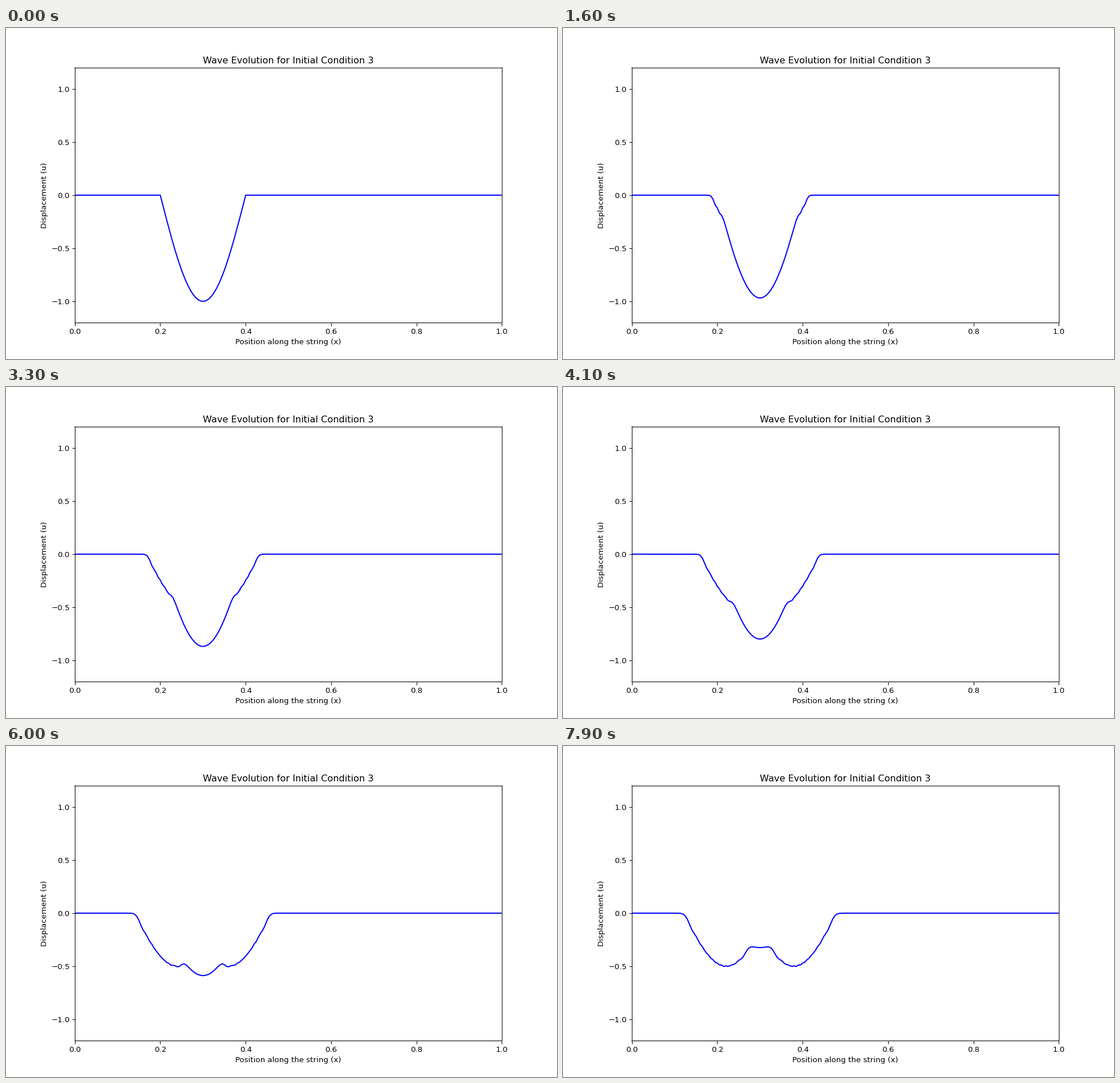
A matplotlib script for the animation above (8000 ms loop, 966x580 px).

```python
import numpy as np
import matplotlib.pyplot as plt
from matplotlib.animation import FuncAnimation

FRAMES = 80
INTERVAL = 100
C, DX, DT = 1.0, 0.005, 0.001
HALF_PIXEL = 0.36  # points

x = np.linspace(0, 1, round(1 / DX) + 1)


def laplacian(u):
    lap = np.zeros_like(u)
    lap[1:-1] = u[2:] - 2 * u[1:-1] + u[:-2]
    return lap


def solve(steps):
    """Leapfrog solution of the wave equation, string released from rest."""
    r2 = (C * DT / DX) ** 2
    pulse = (x > 0.2 - DX / 2) & (x < 0.4 + DX / 2)
    u = np.zeros((steps, x.size))
    u[0] = np.where(pulse, np.sin(5 * np.pi * x), 0)
    u[1] = u[0] + 0.5 * r2 * laplacian(u[0])
    for n in range(1, steps - 1):
        u[n + 1] = 2 * u[n] - u[n - 1] + r2 * laplacian(u[n])
    return u


waves = solve(FRAMES)

# 966 x 580 pixels
fig, ax = plt.subplots(figsize=(10, 6.0042), dpi=96.6)
line, = ax.plot(x, waves[0], color="blue")

# Soft frame, shifted half a pixel right and down
for side, sign in dict(left=-1, right=1, top=-1, bottom=1).items():
    ax.spines[side].set_position(("outward", sign * HALF_PIXEL))
    ax.spines[side].set_snap(False)

ax.set_xlim(0, 1)
ax.set_ylim(-1.2, 1.2)
ax.set_title("Wave Evolution for Initial Condition 3")
ax.set_xlabel("Position along the string (x)")
ax.set_ylabel("Displacement (u)")


def update(frame):
    line.set_ydata(waves[frame])
    return line,


anim = FuncAnimation(fig, update, frames=FRAMES, interval=INTERVAL,
                     repeat=True, repeat_delay=0)
plt.show()
```
